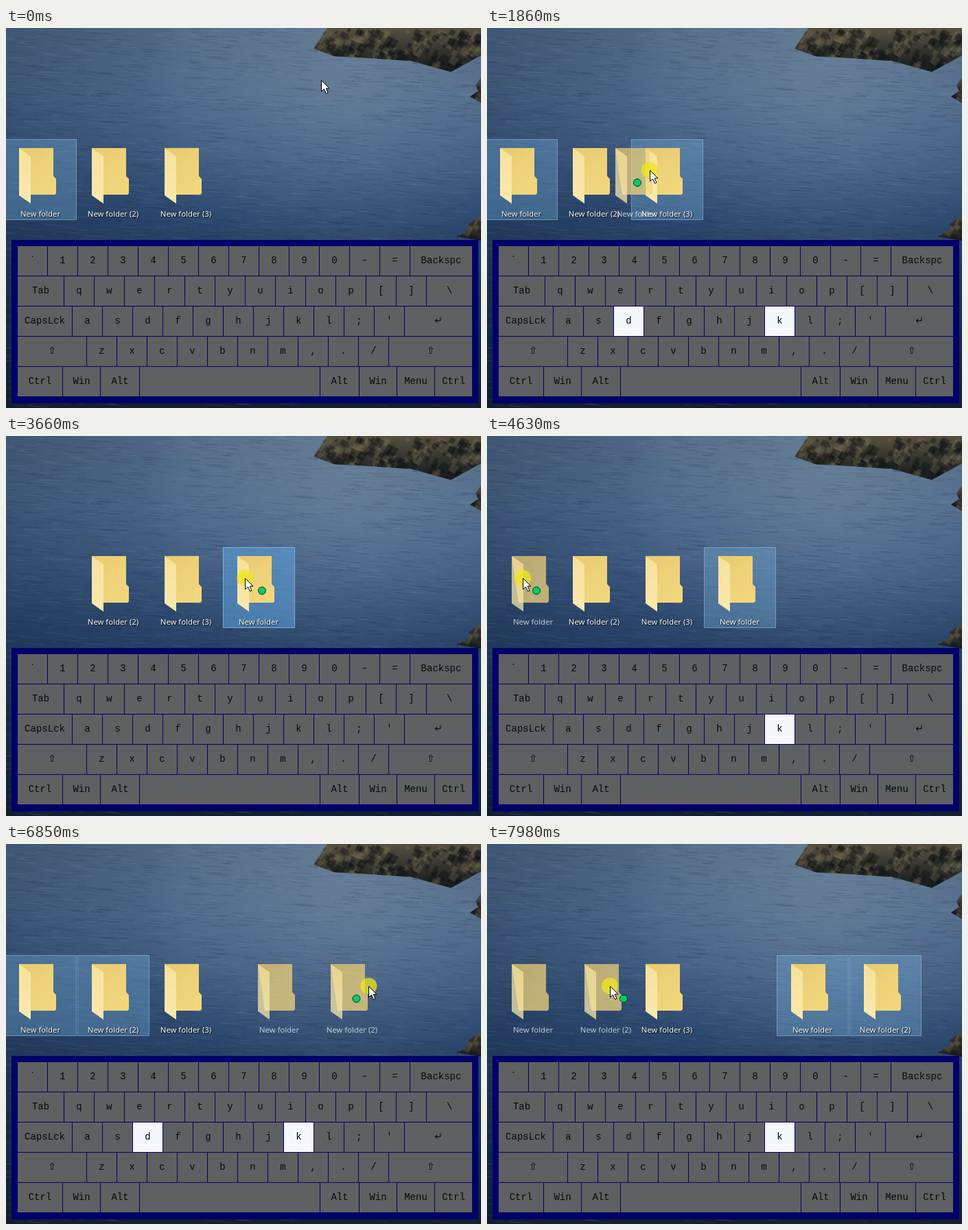
These frames come from a looping animation (692 px wide and 554 px high, 8000 ms). An HTML page with a canvas:

```html
<!DOCTYPE html>
<html lang="en">
<head>
<meta charset="utf-8">
<title>Keyboard mouse</title>
<style>
html, body { margin: 0; width: 692px; height: 554px; overflow: hidden; background: #16243c; }
canvas { display: block; }
</style>
</head>
<body>
<canvas id="stage" width="692" height="554"></canvas>
<script>
const W = 692, H = 554, LOOP = 8000, NAVY = '#000068';
const PITCH = 106, LEFT = 19, ICON_Y = 175, BOX_Y = 162, BOX_W = 105, BOX_H = 118, ROW = 207;
const ctx = document.getElementById('stage').getContext('2d');

let seed = 7;
const rnd = () => (seed = (seed * 16807) % 2147483647) / 2147483647;

function poly(g, pts, fill) {
  g.beginPath();
  for (let i = 0; i < pts.length; i += 2) g.lineTo(pts[i], pts[i + 1]);
  g.closePath();
  g.fillStyle = fill;
  g.fill();
}

function blend(g, x0, y0, x1, y1, ...colors) {
  const lg = g.createLinearGradient(x0, y0, x1, y1);
  colors.forEach((c, i) => lg.addColorStop(i / (colors.length - 1), c));
  return lg;
}

// ---------- sea and rocks ----------
function drawSea(g) {
  g.fillStyle = blend(g, 0, 0, 0, H, '#526a86', '#4d6888', '#3f5b80', '#2b476c', '#1f3658', '#182a45', '#121e32');
  g.fillRect(0, 0, W, H);
  const glow = g.createRadialGradient(500, 75, 20, 500, 75, 300);
  glow.addColorStop(0, 'rgba(150,168,184,.3)');
  glow.addColorStop(1, 'rgba(150,168,184,0)');
  g.fillStyle = glow;
  g.fillRect(0, 0, W, H);
  g.fillStyle = blend(g, 0, 0, 260, 0, 'rgba(10,28,54,.25)', 'rgba(10,28,54,0)');
  g.fillRect(0, 0, W, H);
  for (let i = 0; i < 3200; i++) {
    const x = rnd() * W - 20, y = rnd() * H, len = 8 + rnd() * 26;
    g.strokeStyle = rnd() < .5 ? 'rgba(150,175,200,.11)' : 'rgba(8,22,48,.15)';
    g.beginPath();
    g.moveTo(x, y);
    g.lineTo(x + len, y + len * .07);
    g.stroke();
  }
}

function rock(g, x, y, w, h, ...pts) {
  g.save();
  poly(g, pts, blend(g, 0, y, 0, y + h, '#55503f', '#35352f', '#16191d'));
  g.clip();
  for (let i = 0; i < w * h / 60; i++) {
    const px = x + rnd() * w, py = y + rnd() * h, s = 3 + rnd() * 8;
    poly(g, [px, py, px + s, py + s * .5, px + s * .3, py + s * 1.6, px - s * .6, py + s],
      rnd() < .55 ? 'rgba(14,18,22,.4)' : 'rgba(128,116,88,.28)');
  }
  g.restore();
}

// ---------- keyboard ----------
const keys = {}, allKeys = [];

function addRow(row, spec) {
  let x = 17;
  for (const [label, right] of spec) {
    const key = { label, x, y: 318 + row * 44, w: right - x - 1 };
    allKeys.push(key);
    keys[label] = keys[label] || key;
    x = right;
  }
}

function letterRow(row, first, edge, letters, last) {
  const spec = [...letters].map((c, i) => [c, edge + 44 * (i + 1)]);
  if (first) spec.unshift([first, edge]);
  addRow(row, [...spec, [last, 680]]);
}

letterRow(0, '', 17, '`1234567890-=', 'Backspc');
letterRow(1, 'Tab', 85, 'qwertyuiop[]', '\\');
letterRow(2, 'CapsLck', 97, "asdfghjkl;'", '↵');
letterRow(3, '⇧', 118, 'zxcvbnm,./', '⇧');
addRow(4, [['Ctrl', 83], ['Win', 138], ['Alt', 195], ['', 458], ['Alt', 515], ['Win', 570], ['Menu', 625], ['Ctrl', 680]]);

function drawKey(g, key, lit) {
  g.fillStyle = lit ? '#f5f8fb' : '#5f6061';
  g.fillRect(key.x, key.y, key.w, 43);
  g.fillStyle = '#08080a';
  g.textAlign = 'center';
  g.font = '⇧↵'.includes(key.label) ? '14px "DejaVu Sans", sans-serif' : '14px "Liberation Mono", monospace';
  g.fillText(key.label, key.x + key.w / 2, key.y + 25);
}

const back = document.createElement('canvas');
back.width = W;
back.height = H;
{
  const g = back.getContext('2d');
  drawSea(g);
  rock(g, 448, 0, 244, 64, 468, 0, 448, 30, 478, 41, 530, 44, 590, 48, 648, 64, 692, 40, 692, 0);
  rock(g, 676, 72, 16, 36, 692, 72, 684, 84, 688, 92, 676, 100, 692, 109);
  rock(g, 656, 274, 36, 36, 692, 274, 674, 286, 674, 294, 656, 304, 692, 310);
  g.fillStyle = NAVY;
  g.fillRect(8, 309, 680, 238);
  allKeys.forEach(key => drawKey(g, key, false));
}

// ---------- story ----------
const start = { x: 459, y: 76 };
const moves = [];

// Pointer glides at a steady speed; long hauls run faster.
function move(at, held, x, y = ROW, until) {
  const from = moves.length ? moves[moves.length - 1].to : start;
  const dist = Math.max(Math.abs(x - from.x), Math.abs(y - from.y));
  const time = dist / (dist > 300 ? 1.15 : .67) || 1;
  moves.push({ at, time, from, to: { x, y }, keys: held.split(' '), until: until || at + time });
}

move(200, 'Ctrl', start.x, start.y, 400);
move(400, 'a s', 285);
move(840, 'a', 165, ROW, 1560);
move(1250, '', 69);
move(1715, 'd', 536, ROW, 2400);
move(2690, 'a', 505);
move(3050, 'a', 431);
move(3505, '', 353);
move(3654, 'a', 86);
move(4230, 'a', 52);
move(5000, 'w', 52, 80);
move(5300, 's d', 215, ROW, 5780);
move(6295, 'a', 180);
move(6548, 'd', 595, ROW, 7285);
move(7550, '', 586);
move(7590, 'a', 179);

const presses = [[1610, 2365], [2900, 3395], [3645, 4725], [5210, 5780], [6440, 7130], [7570, LOOP]];

function cursorAt(t) {
  const m = moves.filter(m => m.at <= t).pop();
  if (!m) return start;
  const k = Math.min(1, (t - m.at) / m.time);
  return { x: m.from.x + (m.to.x - m.from.x) * k, y: m.from.y + (m.to.y - m.from.y) * k };
}

// The on-screen keyboard shows each key a moment late.
function litKeys(t) {
  const s = t - 35;
  const lit = moves.filter(m => s >= m.at && s < m.until).flatMap(m => m.keys);
  if (presses.some(([down, up]) => s >= down && s < up)) lit.push('k');
  return lit.filter(Boolean);
}

const over = (f, p) => p.y > BOX_Y && p.y < BOX_Y + BOX_H && p.x >= f.x - 21 && p.x < f.x - 21 + BOX_W;
const snap = x => LEFT + PITCH * Math.round((x - LEFT) / PITCH);

// Replays every press up to t: on a folder it drags, elsewhere it selects.
function desktopAt(t) {
  const folders = ['New folder', 'New folder (2)', 'New folder (3)']
    .map((name, i) => ({ name, x: LEFT + PITCH * i, on: i === 0 }));
  let press = null;
  for (const [down, up] of presses) {
    if (t < down) break;
    const from = cursorAt(down), to = cursorAt(Math.min(t, up)), dx = to.x - from.x;
    const drag = folders.some(f => over(f, from));
    if (!drag) folders.forEach(f => { f.on = to.x > f.x && to.y > ICON_Y; });
    if (t < up) press = { from, to, dx, drag };
    else if (drag) folders.filter(f => f.on).forEach(f => { f.x = snap(f.x + dx); });
  }
  return { folders, press };
}

// ---------- drawing ----------
function drawFolder({ name, x }, ghost) {
  ctx.save();
  ctx.translate(x, ICON_Y);
  ctx.globalAlpha = ghost ? .74 : 1;
  poly(ctx, [0, 0, 50, 0, 50, 41, 54, 45, 54, 66, 52, 68, 10, 68], blend(ctx, 0, 0, 50, 68, '#e8c86c', '#eed27a', '#f3d77c'));
  poly(ctx, [0, 0, 17, 12, 17, 81, 0, 69], blend(ctx, 0, 0, 17, 70, '#f7e19a', '#fae8ac'));
  ctx.font = '11.4px "Open Sans", "Noto Sans", sans-serif';
  ctx.textAlign = 'center';
  ctx.fillStyle = '#fff';
  if (!ghost) {
    ctx.shadowColor = '#000';
    ctx.shadowBlur = 2;
    ctx.shadowOffsetX = ctx.shadowOffsetY = 1;
  }
  ctx.fillText(name, 31, 100);
  ctx.restore();
}

function frameBox(x, y, w, h, fill, line) {
  ctx.fillStyle = fill;
  ctx.fillRect(x, y, w, h);
  ctx.strokeStyle = line;
  ctx.strokeRect(x + .5, y + .5, w - 1, h - 1);
}

function drawHighlight(f, hover) {
  const hot = f.on && hover;
  if (f.on || hover)
    frameBox(f.x - 21, BOX_Y, BOX_W, BOX_H, hot ? 'rgba(96,170,232,.5)' : 'rgba(122,178,222,.34)',
      hot ? 'rgba(140,200,240,.65)' : 'rgba(150,200,228,.45)');
}

function disc(x, y, r, fill) {
  ctx.beginPath();
  ctx.arc(x, y, r, 0, 7);
  ctx.fillStyle = fill;
  ctx.fill();
}

function drawPointer({ x, y }) {
  ctx.save();
  ctx.translate(Math.round(x) + .5, Math.round(y) + .5);
  poly(ctx, [0, 0, 0, 16, 4, 12.5, 7, 19, 9.5, 18, 6.7, 11.5, 11.5, 11.5], '#fff');
  ctx.strokeStyle = '#000';
  ctx.stroke();
  ctx.restore();
}

function draw(t) {
  const at = cursorAt(t), { folders, press } = desktopAt(t);

  ctx.drawImage(back, 0, 0);
  for (const f of folders) {
    drawHighlight(f, over(f, at));
    drawFolder(f);
  }
  litKeys(t).forEach(id => drawKey(ctx, keys[id], true));

  if (press && press.drag && Math.abs(press.dx) > 5)
    folders.filter(f => f.on).forEach(f => drawFolder({ name: f.name, x: f.x + Math.round(press.dx) }, true));
  if (press && !press.drag && press.dx > 1)
    frameBox(press.from.x, press.from.y, Math.round(press.dx), Math.round(at.y - press.from.y),
      'rgba(0,102,204,.33)', '#0078d7');

  // The green marker trails the pointer.
  if (t >= 200) {
    const late = cursorAt(t - 33);
    disc(late.x + 20, late.y + 18.5, 5.5, '#00cc6a');
    ctx.strokeStyle = '#04301c';
    ctx.stroke();
  }
  if (press) disc(at.x, at.y, 12, 'rgba(238,230,28,.76)');
  drawPointer(at);
}

const begin = performance.now();
function loop() {
  draw((performance.now() - begin) % LOOP);
  requestAnimationFrame(loop);
}
loop();
</script>
</body>
</html>
```
